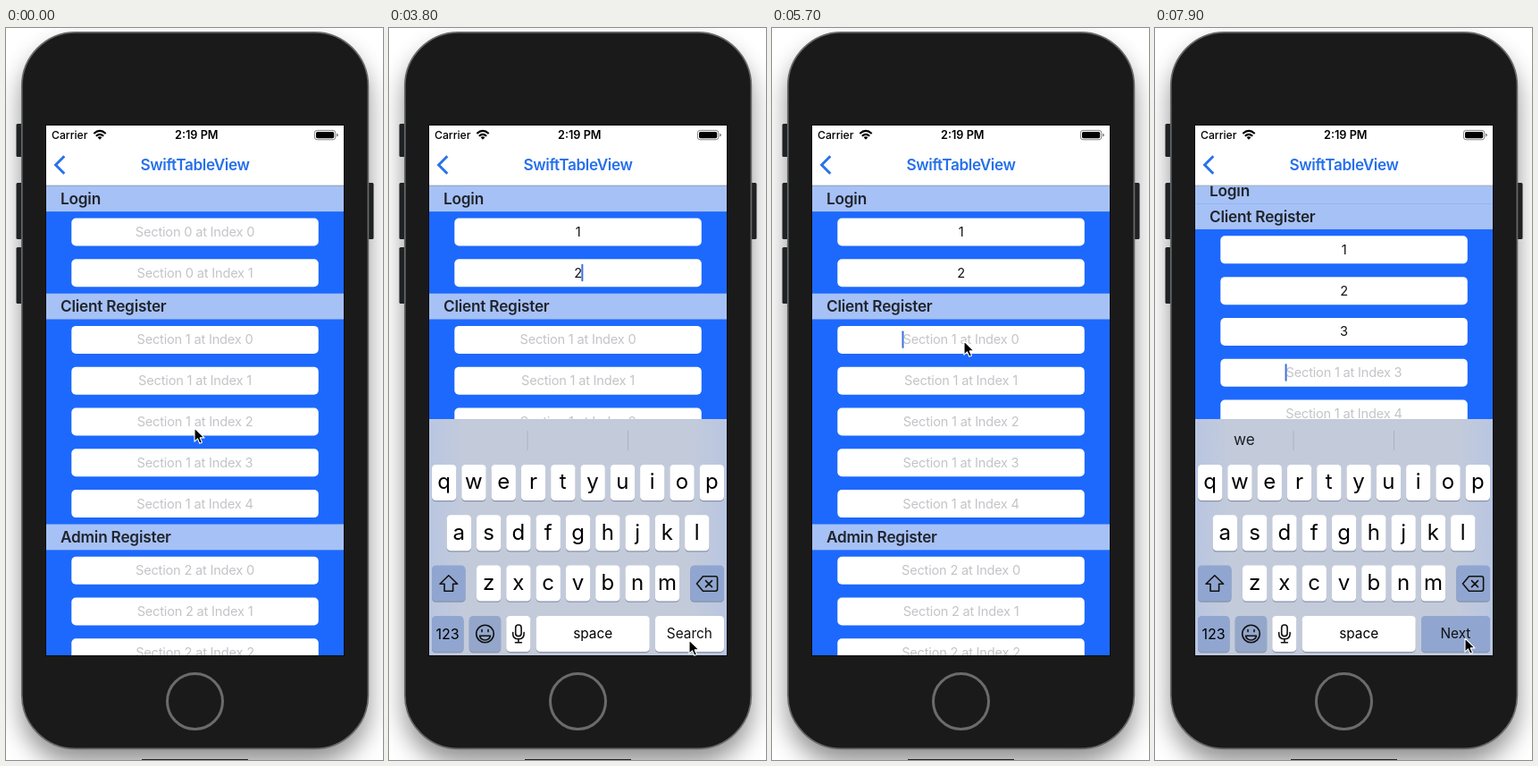
An HTML page for the animation above (8000 ms loop, 422 px wide and 818 px high).

```html
<!DOCTYPE html>
<html lang="en">
<head>
<meta charset="utf-8">
<title>Form with sections</title>
<style>
  html, body { margin: 0; width: 100%; height: 100%; overflow: hidden; background: #fff; }
  svg { display: block; width: 100%; height: 100%; font-family: Inter, Roboto, sans-serif; }
  .mid { text-anchor: middle; }
  .semi { font-weight: 600; }
  .head { font-size: 17.2px; font-weight: 600; letter-spacing: -.2px; fill: #20242c; }
  .field { font-size: 14.6px; letter-spacing: -.2px; text-anchor: middle; }
  .letter { font-size: 24px; text-anchor: middle; }
  .label { font-size: 15.4px; text-anchor: middle; }
  .line { fill: none; stroke: #111; stroke-width: 1.6; stroke-linecap: round; stroke-linejoin: round; }
</style>
</head>
<body>
<svg viewBox="0 0 422 818" xmlns="http://www.w3.org/2000/svg">
  <defs>
    <filter id="blur" x="-20%" y="-20%" width="140%" height="140%"><feGaussianBlur stdDeviation="14"/></filter>
    <clipPath id="screen"><rect x="45" y="109" width="333" height="592"/></clipPath>
    <clipPath id="box"><rect x="71" y="340" width="281" height="130" rx="12"/></clipPath>
    <linearGradient id="board">
      <stop offset="0" stop-color="#b9c6e1"/><stop offset=".12" stop-color="#c3cbdb"/>
      <stop offset=".88" stop-color="#c3cbdb"/><stop offset="1" stop-color="#b9c6e1"/>
    </linearGradient>
    <linearGradient id="glass" x2="0" y2="1">
      <stop offset="0" stop-color="#dce9f6"/><stop offset="1" stop-color="#e3eefa"/>
    </linearGradient>
    <linearGradient id="held" x2="0" y2="1">
      <stop offset="0" stop-color="#c6d3e5"/><stop offset="1" stop-color="#c0d8f5"/>
    </linearGradient>
  </defs>

  <rect width="422" height="818" fill="#fff"/>
  <rect x="17" y="20" width="389" height="802" rx="62" opacity=".43" filter="url(#blur)"/>
  <g fill="#202122">
    <rect x="11.5" y="107" width="9" height="37" rx="1.5"/>
    <rect x="11.5" y="173" width="9" height="63" rx="1.5"/>
    <rect x="11.5" y="245" width="9" height="63" rx="1.5"/>
    <rect x="402" y="173" width="9.5" height="63" rx="1.5"/>
  </g>
  <rect x="17.8" y="4.8" width="387.6" height="800.6" rx="60" fill="#1a1a1a" stroke="#65696b" stroke-width="1.7"/>
  <circle cx="211.5" cy="752.5" r="31" fill="none" stroke="#6b6b6b" stroke-width="3"/>
  <rect x="152" y="817" width="119" height="1" fill="#222"/>
  <rect x="44.5" y="108.5" width="334" height="593" fill="#1d69fd" stroke="#0d0d0d"/>

  <g clip-path="url(#screen)">
    <g id="list"></g>
    <rect id="caret" width="2" height="19.5" rx=".8" fill="#3a6fdc"/>

    <rect x="45" y="109" width="333" height="67" fill="#fff"/>
    <rect x="45" y="175.6" width="333" height=".9" fill="#a5a9b3"/>
    <text x="51" y="124" font-size="12.2" font-weight="500">Carrier</text>
    <g fill="none" stroke="#000" stroke-width="2.1">
      <path d="M98.3 118.1Q105 111.8 111.7 118.1M100.8 120.7Q105 116.9 109.2 120.7"/>
      <path d="M105 124.8L102.6 122.3Q105 120.3 107.4 122.3Z" fill="#000" stroke="none"/>
    </g>
    <text class="mid semi" x="213.3" y="124" font-size="12.7">2:19 PM</text>
    <rect x="345.4" y="114.4" width="23.4" height="10.4" rx="2.8" fill="none" stroke="#777" stroke-width=".9"/>
    <rect x="347" y="116" width="20.2" height="7.2" rx="1.6"/>
    <path d="M370.2 117.7q1.7 .4 1.7 1.9t-1.7 1.9z" fill="#777"/>
    <path id="back" d="M65.3 143.3L55.6 153L65.3 162.7" fill="none" stroke-width="3"/>
    <text class="mid semi" x="211.5" y="159" font-size="17.2" letter-spacing="-.38" fill="#2670ea">SwiftTableView</text>

    <g id="keys">
      <rect x="45" y="437" width="333" height="264" fill="url(#board)"/>
      <path d="M155 450v22M267.5 450v22" stroke="#a7b2c7"/>
    </g>

    <rect id="dim" x="45" y="109" width="333" height="592"/>
    <g id="alert">
      <g clip-path="url(#box)">
        <rect x="71" y="340" width="281" height="130" fill="url(#glass)"/>
        <rect id="press" x="71" y="424" width="281" height="46" fill="url(#held)"/>
        <rect x="71" y="423.5" width="281" height=".8" fill="#aebfd4"/>
      </g>
      <text class="mid semi" x="211.5" y="378" font-size="17.2">Section 0 at Index 1</text>
      <rect x="158.3" y="385.3" width="17.4" height="17.4" rx="3" fill="#1fb93c" stroke="#128a2a" stroke-width=".8"/>
      <path d="M161.8 394.6L165.6 398.8L172.4 388.8" fill="none" stroke="#fff" stroke-width="2.6"/>
      <text x="181" y="399" font-size="13.5">Editing Done!</text>
      <path d="M201.5 447.5Q206.5 446.5 208 441.5Q208.6 436.5 211 436.6Q214.4 437 213.6 441.5L212.7 445H219.6Q222 445.4 221.4 447.8Q222.6 449.4 221 451.2Q221.8 453.2 219.8 454.5Q220 457.8 217 458H209.5Q206 457.6 201.5 456.5Z" fill="#fcc436" stroke="#dc9420" stroke-width=".8"/>
      <path d="M214 448.3h6.8M214 451.5h6.4M214 454.7h5.6" stroke="#d88b1d" stroke-width=".9"/>
    </g>
  </g>

  <path id="mouse" d="M0 0V15.2L3.5 11.9L5.8 17.2L8.5 16L6.2 10.9H11Z" fill="#000" stroke="#fff" stroke-width="1.1" stroke-linejoin="round"/>
</svg>

<script>
(() => {
const LOOP = 8000, STEP = 100;
const NAV = 176.3, HEAD = 28.8, ROW = 45.8, MID = 211.5, KEYBOARD = 266;
const $ = id => document.getElementById(id);

const set = (el, attrs) => { for (const k in attrs) el.setAttribute(k, attrs[k]); };
function add(parent, tag, attrs, text) {
  const el = document.createElementNS('http://www.w3.org/2000/svg', tag);
  set(el, attrs || {});
  if (text) el.textContent = text;
  return parent.appendChild(el);
}

// Table: rows first, headers above them
const heads = [], rows = [];
const rowLayer = add($('list'), 'g'), headLayer = add($('list'), 'g');
let edge = NAV;
[['Login', 2], ['Client Register', 5], ['Admin Register', 3]].forEach(([name, count], s) => {
  const g = add(headLayer, 'g');
  add(g, 'rect', { x: 45, width: 333, height: HEAD, fill: '#a6c1f5' });
  add(g, 'text', { class: 'head', x: 61, y: 20.7 }, name);
  heads.push({ g, y: edge });
  edge += HEAD;
  for (let i = 0; i < count; i++, edge += ROW) {
    const g = add(rowLayer, 'g');
    add(g, 'rect', { x: 73.3, y: -15.5, width: 276.5, height: 31, rx: 5, fill: '#fff' });
    rows.push({ g, y: edge + ROW / 2, hint: `Section ${s} at Index ${i}`,
      text: add(g, 'text', { class: 'field', x: MID, y: 5 }) });
  }
});

// Keyboard
const keys = $('keys'), GREY = '#90a6d0';
function key(x, y, w, fill = '#fff') {
  add(keys, 'rect', { x, y: y + 1.2, width: w, height: 40, rx: 4.3, fill: '#8993a8' });
  return add(keys, 'rect', { x, y, width: w, height: 40, rx: 4.3, fill });
}
[['qwertyuiop', 48, 488], ['asdfghjkl', 64.7, 544.3], ['zxcvbnm', 98, 600.6]].forEach(([chars, x, y]) =>
  [...chars].forEach((c, i) => {
    key(x + i * 33.3, y, 27.3);
    add(keys, 'text', { class: 'letter', x: x + i * 33.3 + 13.6, y: y + 27.2 }, c);
  }));
key(48, 600.6, 37.5, GREY);
key(337.3, 600.6, 37.7, GREY);
key(48, 657, 35.5, GREY);
key(89.7, 657, 35.5, '#94a7cb');
key(131.3, 657, 27);
key(164.7, 657, 127);
const goKey = key(298, 657, 77, GREY);
add(keys, 'text', { class: 'label', x: 65.6, y: 683.3, style: 'font-size:16px' }, '123');
add(keys, 'text', { class: 'label', x: 228.2, y: 682 }, 'space');
const goText = add(keys, 'text', { class: 'label', x: 336.4, y: 682 });
const icon = d => add(keys, 'path', { class: 'line', d });
icon('M66.8 611.8L76.6 621.3H71.6V629.2H62V621.3H57Z');
icon('M351.5 612.8H365.5Q367.6 612.8 367.6 615V627Q367.6 629.2 365.5 629.2H351.5L344.5 621ZM354.5 617.6L361.5 624.6M361.5 617.6L354.5 624.6');
add(keys, 'circle', { class: 'line', cx: 107.5, cy: 677, r: 9.8 });
icon('M101.5 679.2H113.5Q112.5 684 107.5 684T101.5 679.2Z');
icon('M104 672.6v2M111 672.6v2');
add(keys, 'rect', { class: 'line', x: 141.7, y: 667, width: 6.4, height: 12.6, rx: 3.2 });
icon('M138.7 675.5V677Q138.7 682.8 144.9 682.8T151.1 677V675.5M144.9 682.8V686.7M141.4 686.7H148.4');
const word = add(keys, 'text', { class: 'mid', x: 99.8, y: 466, 'font-size': 17.2, fill: '#1c2027' });
const quote = add(keys, 'g', { 'font-size': 17.2, fill: '#1c2027' });
add(quote, 'text', { x: 88, y: 466 }, '“1');
add(quote, 'text', { x: 104, y: 466, 'font-size': 14, fill: '#98a2b4' }, '”');

// Script of the session; rows are counted from the top of the table
const typed = [[1900, 0, '1'], [3400, 1, '2'], [6300, 2, '1'], [6950, 3, '2'], [7500, 4, '3']];
const focused = [[0, -1], [700, 0], [2700, 1], [3900, -1], [5700, 2], [6600, 3], [7300, 4], [7655, 5]];
const presses = [[2600, 2700], [3700, 4200], [6500, 6600], [7200, 7300], [7600, 7690]];
const route = [
  [0, 211, 447], [100, 211, 447], [600, 212, 230], [1850, 212, 230], [2100, 232, 330], [2500, 337, 684],
  [3800, 336, 684], [4200, 336, 684], [4750, 221, 467], [5150, 221, 467], [5550, 215, 350], [5900, 215, 350],
  [6250, 398, 740], [6450, 349, 682], [7100, 349, 682], [7900, 347, 682], [8000, 347, 682]
];

const clamp = v => Math.max(0, Math.min(1, v));
const ease = v => { v = clamp(v); return v * v * (3 - 2 * v); };
const ramp = (t, from, ms) => ease((t - from) / ms);

function mouseAt(t) {
  const i = Math.max(1, route.findIndex(p => p[0] >= t));
  const [t0, x0, y0] = route[i - 1], [t1, x1, y1] = route[i];
  const k = (t - t0) / (t1 - t0);
  return [x0 + (x1 - x0) * k, y0 + (y1 - y0) * k];
}

function draw(t) {
  const [since, active] = focused.filter(f => f[0] <= t).pop();
  const scroll = 13 * ramp(t, 6600, 300) + ROW * (ramp(t, 7300, 300) + ramp(t, 7655, 300));

  let lastEdit = since;
  rows.forEach((r, i) => {
    const entry = typed.find(e => e[1] === i && e[0] <= t);
    if (entry && i === active) lastEdit = entry[0];
    r.value = entry ? entry[2] : '';
    r.text.textContent = r.value || r.hint;
    set(r.text, { fill: r.value ? '#111' : '#c3c4c8' });
    set(r.g, { transform: `translate(0 ${r.y - scroll})` });
  });
  heads.forEach((h, i) => {
    const next = heads[i + 1];
    let y = Math.max(NAV, h.y - scroll);
    if (next) y = Math.min(y, next.y - scroll - HEAD);
    set(h.g, { transform: `translate(0 ${y})` });
  });

  const row = rows[active];
  const lit = row && (t - lastEdit) % 1060 < 530;
  set($('caret'), { visibility: lit ? 'visible' : 'hidden' });
  if (row) {
    const half = row.text.getComputedTextLength() / 2;
    set($('caret'), { x: row.value ? MID + half - .5 : MID - half - 1, y: row.y - scroll - 10 });
  }

  const up = ramp(t, 700, 300) - ramp(t, 3900, 300) + ramp(t, 5700, 300);
  set(keys, { transform: `translate(0 ${(1 - up) * KEYBOARD})` });
  const search = t >= 2700 && t < 4300;
  const pressed = presses.some(([a, b]) => t >= a && t < b);
  goText.textContent = search ? 'Search' : 'Next';
  set(goText, { fill: search && !pressed ? '#fff' : '#111' });
  set(goKey, { fill: pressed ? '#fff' : search ? '#1c6cf5' : GREY });
  word.textContent = t >= 6100 ? 'we' : '';
  set(quote, { visibility: t >= 2000 && t < 2700 ? 'visible' : 'hidden' });

  const shown = ramp(t, 3900, 300) - ramp(t, 4950, 250);
  const size = t < 4500 ? 1.15 - .15 * shown : 1;
  set($('dim'), { opacity: .42 * shown });
  set($('back'), { stroke: shown > .3 ? '#a0a0a0' : '#2a73ec' });
  set($('alert'), {
    opacity: shown,
    transform: `translate(${MID} 405) scale(${size}) translate(${-MID} -405)`
  });
  set($('press'), { opacity: t >= 4800 ? 1 : 0 });

  set($('mouse'), { transform: `translate(${mouseAt(t).join(' ')})` });
}

const start = performance.now();
function tick() {
  const t = (performance.now() - start + 5) % LOOP;
  draw(Math.floor(t / STEP) * STEP);
  requestAnimationFrame(tick);
}
tick();
})();
</script>
</body>
</html>
```
